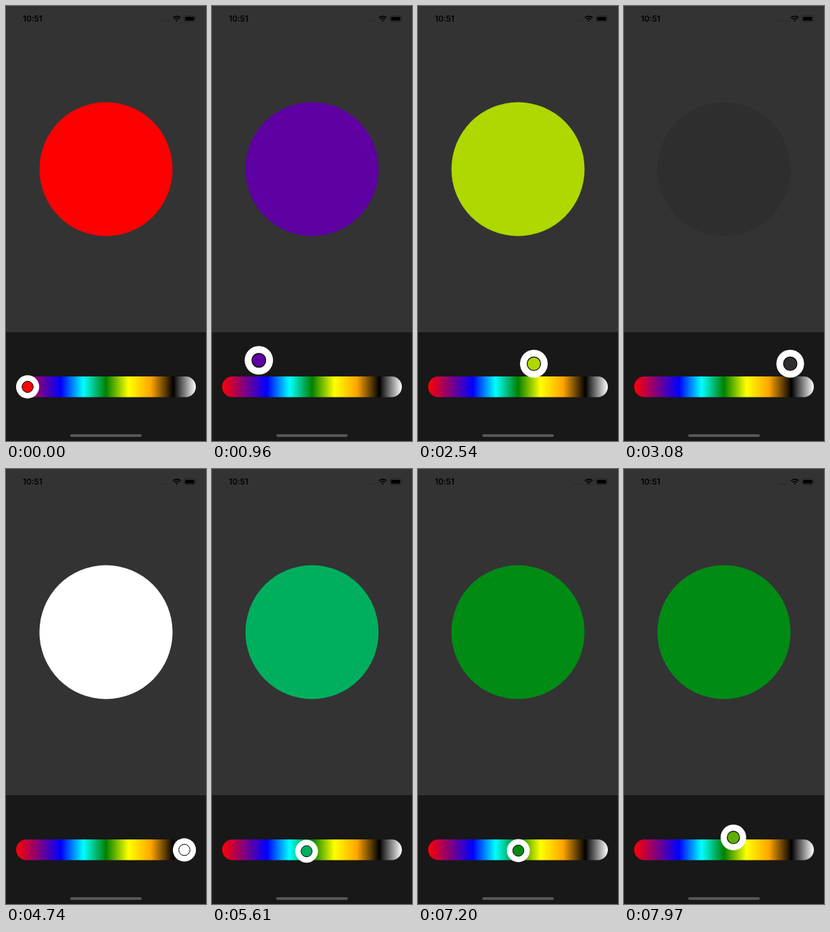
Animation of 296 by 640 pixels, one loop 8000 ms. Source, as an HTML page:

```html
<!DOCTYPE html>
<html lang="en">
<head>
<meta charset="utf-8">
<title>Colour slider</title>
<style>
  html, body { margin: 0; width: 100%; height: 100%; overflow: hidden; background: #333; }
  svg { display: block; width: 100vw; height: 100vh; }
  text { font: 600 11.8px Inter, "Liberation Sans", sans-serif; }
</style>
</head>
<body>
<svg viewBox="0 0 296 640">
  <defs>
    <linearGradient id="hues"></linearGradient>
  </defs>
  <rect width="296" height="640" fill="#333"/>
  <rect y="480" width="296" height="160" fill="#181818"/>

  <text x="25" y="23">10:51</text>
  <g fill="#222">
    <circle cx="230.5" cy="22" r=".8"/>
    <circle cx="233.7" cy="22" r=".8"/>
    <circle cx="236.9" cy="22" r=".8"/>
    <circle cx="240.1" cy="22" r=".8"/>
  </g>
  <g fill="none" stroke="#000" stroke-width="1.7">
    <path d="M247 17.4a8.2 8.2 0 0 1 11.4 0"/>
    <path d="M249.2 19.7a5 5 0 0 1 7 0"/>
    <path d="M251 21.2a2.6 2.6 0 0 1 3.4 0L252.7 23z" fill="#000" stroke="none"/>
  </g>
  <rect x="263.5" y="14.5" width="16.5" height="8.5" rx="2.4" fill="none" stroke="#222"/>
  <rect x="265" y="16" width="13.5" height="5.5" rx="1.3"/>
  <path d="M281 17.3q1.4 1.5 0 3z" fill="#222"/>

  <circle id="swatch" cx="148" cy="240" r="98.5"/>
  <rect x="15" y="545" width="266" height="30.5" rx="15.2" fill="url(#hues)"/>
  <g id="thumb">
    <circle r="17.1" fill="#fff"/>
    <circle id="core" r="8.3" stroke="#000"/>
  </g>
  <rect x="95" y="630" width="106" height="4" rx="2" fill="#565656"/>
</svg>
<script>
const LOOP = 8000;
const HUES = [[255, 0, 0], [128, 0, 128], [0, 0, 255], [0, 255, 255], [0, 128, 0],
  [255, 255, 0], [255, 165, 0], [0, 0, 0], [255, 255, 255]];
// Drag: time, thumb x
const DRAG = [[520, 32], [1180, 88], [1380, 88], [1670, 91], [2100, 126], [2540, 171.5],
  [3080, 246], [3200, 262], [3300, 264]];
// Taps: time, thumb x
const TAPS = [[5080, 140], [5750, 225], [6690, 148.5], [7815, 174]];
// Touch down / up times
const TOUCHES = [[450, 3600], ...TAPS.map(([t]) => [t, t + 150])];
const TAP_LAG = 150;

const $ = id => document.getElementById(id);
const swatch = $('swatch'), thumb = $('thumb'), core = $('core');
const clamp = v => Math.min(1, Math.max(0, v));
const mix = (a, b, k) => a + (b - a) * k;
const rgb = c => `rgb(${c.map(Math.round)})`;

$('hues').innerHTML = HUES.map((c, i) =>
  `<stop offset="${i / (HUES.length - 1)}" stop-color="${rgb(c)}"/>`).join('');

function spring(ms) {
  if (ms <= 0) return 0;
  const s = ms / 1000, w = 7.6 * s;
  return 1 - Math.exp(-3.9 * s) * (Math.cos(w) + 0.51 * Math.sin(w));
}

function lift(t) {
  return TOUCHES.reduce((sum, [down, up]) => sum + spring(t - down) - spring(t - up), 0);
}

function thumbX(t) {
  let [t0, x] = DRAG[0];
  for (const [t1, x1] of DRAG.slice(1)) {
    x = mix(x, x1, clamp((t - t0) / (t1 - t0)));
    t0 = t1;
  }
  for (const [start, to] of TAPS) {
    const u = clamp((t - start) / 300);
    x = mix(x, to, u * u * (3 - 2 * u));
  }
  return x;
}

function colorAt(x) {
  const f = clamp(Math.max((x - 31.5) / 239, 1 - (264 - x) / 160));
  const p = f * (HUES.length - 1), i = Math.min(Math.floor(p), HUES.length - 2);
  return rgb(HUES[i].map((v, n) => mix(v, HUES[i + 1][n], p - i)));
}

function draw(now) {
  const t = now % LOOP, x = thumbX(t), k = lift(t);
  thumb.setAttribute('transform',
    `translate(${x} ${560.3 - 34 * k}) scale(${1 + 0.2 * k})`);
  core.setAttribute('fill', colorAt(x));
  swatch.setAttribute('fill', colorAt(t < TAPS[0][0] ? x : thumbX(t - TAP_LAG)));
}

let begin;
function tick(now) {
  begin ??= now;
  draw(now - begin);
  requestAnimationFrame(tick);
}
draw(0);
requestAnimationFrame(tick);
</script>
</body>
</html>
```
